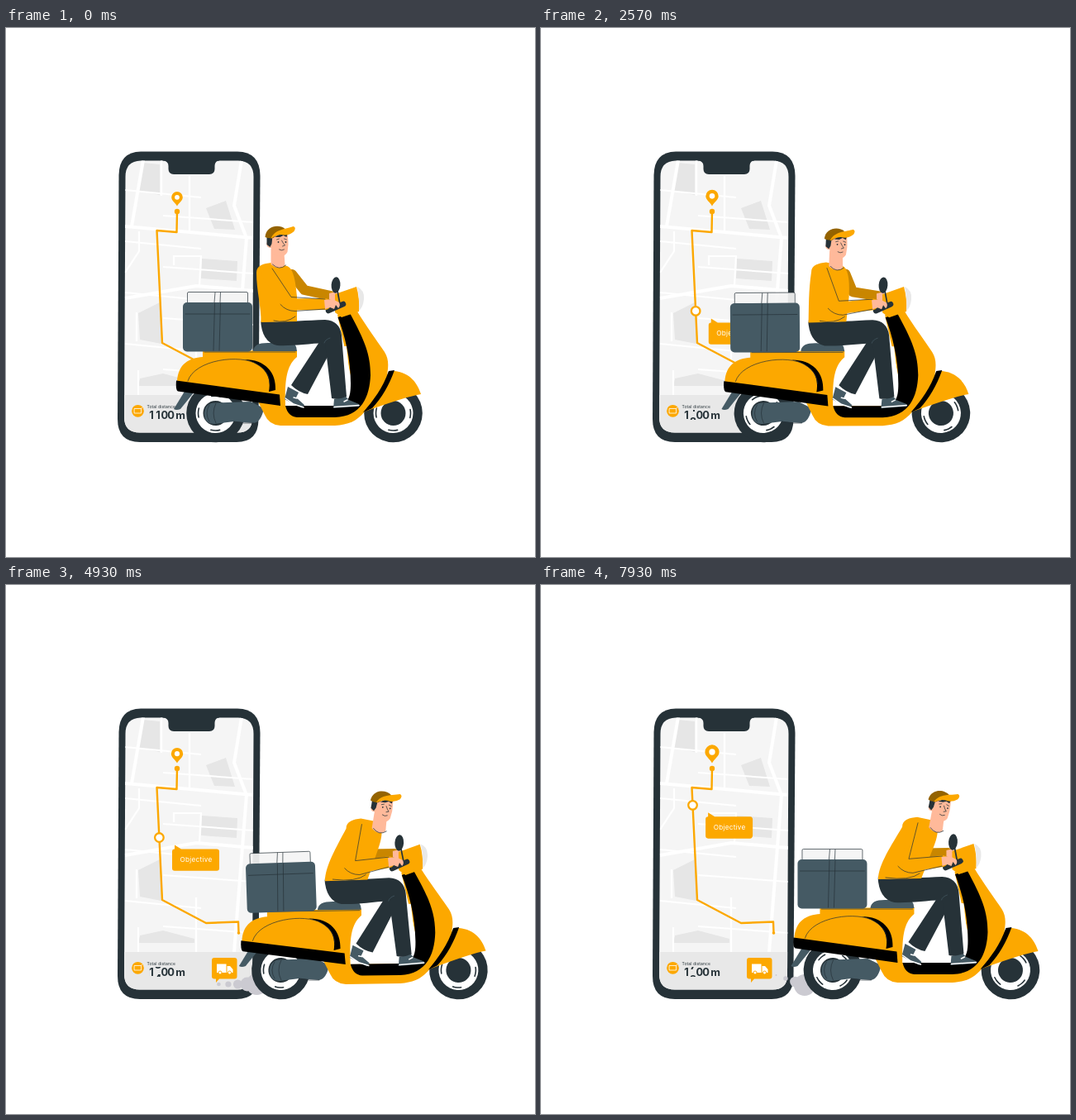
These frames come from a looping animation (640 by 640 pixels, 8 s). An HTML page:

```html
<!DOCTYPE html>
<html lang="en">
<head>
<meta charset="utf-8">
<title>Delivery scooter</title>
<style>
html, body { margin: 0; width: 100%; height: 100%; overflow: hidden; background: #fff; }
svg { display: block; width: 100vw; height: 100vh; }
.o { fill: #fca800; }
.d { fill: #263238; }
.g { fill: #455a64; }
.w { fill: #fff; }
.skin { fill: #ffb99a; }
.line { fill: none; stroke: #263238; stroke-width: .7; stroke-linecap: round; stroke-linejoin: round; }
.round { fill: none; stroke-linecap: round; stroke-linejoin: round; }
.road { fill: none; stroke: #fff; }
text { font-family: Inter, "Open Sans", sans-serif; }
.num { font-weight: 700; font-size: 12.8px; fill: #263238; text-anchor: middle; }
</style>
</head>
<body>
<svg viewBox="0 0 640 640" xmlns="http://www.w3.org/2000/svg">
  <defs>
    <clipPath id="screen"><path d="M163 160.500H281Q299.500 161 299.500 180L298 472Q298 489.500 280 489.500H162Q143 489.500 143 471L144.500 180Q144.500 161 163 160.500Z"/></clipPath>
    <clipPath id="slot"><rect x="179" y="462" width="9.500" height="12"/></clipPath>
    <g id="wheel">
      <circle class="d" r="35.300"/>
      <circle class="w" r="24"/>
      <circle class="d" r="15"/>
      <circle class="line" r="21" stroke-dasharray="11 21.990" stroke-dashoffset="5.500" style="stroke-width:1.600"/>
    </g>
  </defs>

  <path class="d" d="M163 149.500H280Q307.500 150 307.500 179L305.500 474Q305 501 279 501H162Q135 501 135 473L136.500 178Q137 150 163 149.500Z"/>
  <g clip-path="url(#screen)">
    <rect x="140" y="158" width="162" height="334" fill="#f5f5f5"/>
    <path fill="#e6e6e6" d="M166 163L186 165V202L160 197ZM242 218L266 209L277 244L252 243ZM237 279L280 282L279 306L236 303ZM160 345L188 331V382L162 377ZM162 424L190 418L228 428V433H160Z"/>
    <g class="road">
      <path stroke-width="4" d="M144 240L299 254M144 327L230 312L299 318M285 160L276 215L291 254L276 444M152 240L166 160"/>
      <path stroke-width="2.200" d="M188 160V203M222 178V248M161 246V270L144 296M203 287V276H236L234 312M158 344V379M230 378V444M160 414V444"/>
      <g id="lanes" stroke-width="2"></g>
    </g>
    <rect x="140" y="444" width="162" height="48" fill="#e8e8e8"/>
  </g>
  <path class="d" d="M190 158H258V160.500Q252.500 161 252.500 167V170.500Q252.500 177 246 177H203Q196.500 177 196.500 170.500V167Q196.500 161 190 160.500Z"/>

  <path class="round" stroke="#fca800" stroke-width="2.400" d="M207 222L206.500 247L182.500 245L189 381L242 409L281 407.500L281.500 421"/>
  <circle class="o" cx="207" cy="222" r="3.200"/>
  <circle class="o" cx="281.500" cy="421" r="1.800"/>
  <g id="pin">
    <path class="o" d="M0 0C-2-4-6.800-6.500-6.800-10.700A6.800 6.800 0 0 1 6.800-10.700C6.800-6.500 2-4 0 0Z"/>
    <circle class="w" cy="-10.700" r="2.900"/>
  </g>
  <circle id="ring" class="w" r="5.300" stroke="#fca800" stroke-width="2.300"/>
  <g id="callout">
    <path class="o" d="M19 9L27 14H70Q73 14 73 17V37Q73 40.300 70 40.300H19Q16 40.300 16 37V17Q16 14 19 14Z"/>
    <text x="45" y="29.800" font-size="8.200" text-anchor="middle" fill="#fff" letter-spacing=".25">Objective</text>
  </g>

  <circle class="o" cx="159.500" cy="463.300" r="7.400"/>
  <path class="round" stroke="#fff" stroke-width=".8" d="M155.500 460.500H163.500V466H155.500ZM163.500 460.500L165 459"/>
  <text x="170.500" y="460" font-size="5" letter-spacing=".1" class="d">Total distance</text>
  <g class="num">
    <text x="176" y="472.600">1</text>
    <g clip-path="url(#slot)"><text id="digit" x="184"></text><text id="next" x="184"></text></g>
    <text x="191.800" y="472.600">0</text>
    <text x="199.600" y="472.600">0</text>
    <text x="211" y="472.600">m</text>
  </g>
  <path class="o" d="M252 451H276.500Q279.500 451 279.500 454V473.500Q279.500 476.500 276.500 476.500H258L254 481V476.500H252Q249 476.500 249 473.500V454Q249 451 252 451Z"/>
  <path class="w" d="M255 458.500H266.500V469H255ZM267.500 461H271L274.500 465V469H267.500Z"/>
  <g class="w" stroke="#fca800" stroke-width=".9"><circle cx="259" cy="469" r="2"/><circle cx="270.500" cy="469" r="2"/></g>

  <path id="streak" stroke="#fca800" stroke-width="1" opacity=".8"/>

  <g id="ride">
    <g id="smoke" fill="#cbcad1"></g>
    <g transform="translate(253.500 466)"><use href="#wheel" class="spin"/></g>
    <g transform="translate(468.500 466)"><use href="#wheel" class="spin"/></g>
    <path class="g" d="M203 461L217 438L228 440L211 461Q206 463 203 461Z"/>
    <path class="g" d="M252 453.500L296 452L312 460Q309 476 300 478L276 476L252 479Q240 479 240 466Q241 454 252 453.500Z"/>
    <path class="line" d="M246 456Q240 466 246 476M254 454Q248 466 254 478M276 476Q288 479 300 478"/>

    <g id="body">
      <path id="armB" class="round" stroke="#c98600" stroke-width="12"/>
      <path class="skin" d="M391 321L399 319L404 326L398 331L391 328Z"/>
      <path class="o" d="M207 428C208 406 222 399 238 398V391L352 390V398C340 408 337 424 338 457H425L401 347L425 343C434 358 450 380 458 392C463 400 463 408 461 420L463 416L470 415C489 417 498 430 502 443Q484 446 434 464C424 476 414 480 398 481H332Q318 480 313 468L304 450Z"/>
      <path class="w" d="M352 400C342 408 338 426 338 457H395C412 456 417 452 417 432L412 385L400 385Z"/>
      <path d="M401.500 350L416 345C434 378 441 395 441 420C440 446 430 470 398 471H352Q341 470 338 457H396C414 456 417 448 417 430C417 400 410 372 401.500 350Z"/>
      <path d="M463 415L470 414C463 433 455 447 443 460L432 465C445 450 456 435 463 415Z"/>
      <path d="M206 426.500L331 443.500L332 457L208 439.500Q205 438 206 426.500Z"/>
      <path d="M288 401C314 401 327 417 326 438L318 440C322 420 311 406 288 401Z"/>
      <path class="line" d="M220 427C228 401 284 394 304 407C314 413 319 420 319 430M240 392H350"/>
      <path class="g" d="M299 391C300 383 306 380.500 320 381L349 382Q352 386 352 391Z"/>

      <g id="box">
        <rect x="219.500" y="319.500" width="73" height="14" rx="2" fill="#f5f5f5" fill-opacity=".92"/>
        <path class="line" d="M219.500 332V321Q219.500 319.500 221 319.500H291Q292.500 319.500 292.500 321V332M253 320L252 332M259.500 320L259 332"/>
        <rect class="g" x="214" y="332" width="84" height="59.500" rx="5"/>
        <path class="line" d="M217 346H295M252.500 333L251 390M259.500 333L258 390"/>
      </g>

      <path class="d" d="M379 380L345 432Q354 441 365 443L391 394L394 375Z"/>
      <path class="g" d="M341 434L354 441L351 447L361 456L358 460L337 449Z"/>
      <path class="round" stroke="#fff" stroke-width="1.500" d="M338 448L348 455L360 459M348 447L352 448"/>
      <path class="g" d="M397 449L411 446L415 450L427 455V458L396 460Z"/>
      <path class="round" stroke="#fff" stroke-width="1.500" d="M397 458.500L427 456.500M409 452L413 450"/>
      <path class="d" d="M308 355C330 356 360 354 386 353Q404 354 406 372L412 446Q402 450 394 448L386 381C365 382 345 385 328 384Q309 380 308 352Z"/>
      <path class="line" d="M385 381Q386 377 392 375" style="stroke:#455a64"/>

      <path id="torso" class="o"/>
      <g id="head">
        <path class="skin" d="M-8 7V26Q2 34 9 27L8 12Z"/>
        <path class="skin" d="M-10-9L12-12Q13-4 13 2L12 11Q9 17 2 16Q-6 15-8 6Q-14 6-13 0Z"/>
        <path class="d" d="M-13-8L-6-9L-7 1L-9 5L-13 2ZM-3-7Q4-13 12-11L11-7L7-9L3-7Z"/>
        <path d="M-15-7C-14-21 2-23 9-17L-5-6Q-11-5-15-7Z" fill="#946300"/>
        <path class="o" d="M-8-5C-4-17 12-17 19-20Q23-19 20-14Q13-8 5-10Q-2-10-8-5Z"/>
        <path class="line" d="M5-3Q7 1 9 3L6 4M2 8Q5 10 8 8M-1-4L2-5M8-5L11-4M-6 26Q2 34 10 27"/>
        <g class="d"><circle cx="1" cy="-1" r=".9"/><circle cx="10" cy="-1" r=".9"/></g>
      </g>

      <path class="o" d="M398 322L424 313Q428 327 427 343L406 350L398 344Z"/>
      <path d="M425 313Q434 317 433 328Q432 338 427 342Q428 327 425 313Z" fill="#e8e8e8"/>
      <path class="round" stroke="#263238" stroke-width="1.700" d="M401 318L404 334"/>
      <ellipse class="d" cx="399" cy="311" rx="5.400" ry="9.700" transform="rotate(4 399 311)"/>
      <path class="round" stroke="#263238" stroke-width="6.500" d="M390 342L408 334"/>
      <path id="armF" class="round" stroke="#fca800" stroke-width="14"/>
      <path id="folds" class="line"/>
      <path class="skin" d="M385 329L395 328L403 332Q405 336 402 339L399 335L397 340L392 338L386 340Z"/>
    </g>
  </g>
</svg>
<script>
const LOOP = 8000;
const SVG = "http://www.w3.org/2000/svg";
const $ = id => document.getElementById(id);
const set = (id, attrs) => { for (const a in attrs) $(id).setAttribute(a, attrs[a]); };
const clamp = v => Math.min(1, Math.max(0, v));
const lerp = (a, b, k) => a + (b - a) * k;
const ease = (t, from, to) => {
  const u = clamp((t - from) / (to - from));
  return u * u * (3 - 2 * u);
};
const add = (parent, tag) => $(parent).appendChild(document.createElementNS(SVG, tag));
const spins = document.querySelectorAll(".spin");

// Side streets, evenly spaced between the two main avenues
for (let i = 0; i < 8; i++) {
  const y = 196 + i * 31;
  add("lanes", "path").setAttribute("d", i % 2 ? `M190 ${y}L299 ${y + 8}` : `M144 ${y}L236 ${y + 9}`);
}
const puffs = Array.from({ length: 5 }, () => add("smoke", "circle"));

// Creep forward, dash ahead, then start to fall back
const drive = t => .006 * Math.min(t, 3400) + 92.6 * ease(t, 3400, 6000)
  - 13.5 * Math.max(0, (t - 6850) / 1080) ** 3;

// Elbow of a two-bone arm, bent downwards
function elbow([sx, sy], [hx, hy], upper, fore) {
  const dist = Math.hypot(hx - sx, hy - sy);
  const ux = (hx - sx) / dist, uy = (hy - sy) / dist;
  const along = (upper ** 2 - fore ** 2 + dist ** 2) / (2 * dist);
  const out = Math.sqrt(Math.max(0, upper ** 2 - along ** 2));
  return [sx + ux * along - uy * out, sy + uy * along + ux * out];
}

function drawRider(k) {
  const hand = [386, 334];
  const [sx, sy] = [lerp(316, 348, k), lerp(298, 295, k)];
  const [ex, ey] = elbow([sx, sy], hand, 46, 42);
  const waist = 352 + 8 * k;
  set("torso", { d: `M${sx - 13} ${sy - 2}C${sx - 13} ${sy - 11} ${sx - 4} ${sy - 13} ${sx + 5} ${sy - 14}
    L${sx + 24} ${sy - 10}C${sx + 30} ${sy - 8} ${sx + 34} ${sy + 2} ${sx + 36 - 12 * k} ${sy + 27}
    L${waist} 355L308.500 356C309 338 ${sx - 13 - 12 * k} ${sy + 20} ${sx - 13} ${sy - 2}Z` });
  set("armF", { d: `M${sx} ${sy}L${ex} ${ey}L${hand}` });
  set("armB", { d: `M${sx + 30 - 6 * k} ${sy}L${361 + 4 * k} ${317 + 7 * k}L393 324` });
  set("folds", { d: `M${sx + 6} ${sy - 7}L${ex + 1} ${ey - 9}L386 328
    M${ex - 12} ${ey}Q${ex - 5} ${ey + 8} ${ex + 6} ${ey + 8}L386 340
    M${324 - 6 * k} 354Q${waist - 14} 358 ${waist - 2} 349` });
  set("head", { transform: `translate(${328.5 + 50 * k} ${260 + 8.5 * k}) rotate(${10 * k})` });
}

function drawScooter(t) {
  const hold = ease(t, 2000, 4000) - ease(t, 6790, 7930);
  const kick = ease(t, 3400, 4000) - ease(t, 4000, 4700);
  const slide = ease(t, 4900, 6790);
  set("ride", { transform: `translate(${drive(t)} 0)` });
  set("body", { transform: `rotate(${-.8 * hold} 468 466)` });
  set("box", { transform: `translate(${-3 * slide} ${hold - 3 * kick}) rotate(${-1.2 * hold - 4.5 * kick} 256 391)` });
  spins.forEach(w => w.setAttribute("transform", `rotate(${t * .165})`));
  drawRider(ease(t, 1800, 4000) + .08 * ease(t, 6000, 7930));

  const grow = ease(t, 3300, 4800), rise = ease(t, 4930, 6790);
  puffs.forEach((p, i) => {
    p.setAttribute("cx", 224.5 - 11.5 * i - 5 * rise);
    p.setAttribute("cy", 483 + (1 - 4 * i) * rise);
    p.setAttribute("r", 13 * .65 ** i * grow * (1 - .25 * i * rise));
  });
}

function drawPhone(t) {
  const y = 355 - 91 * ease(t, 700, 8700), x = 182.5 + 6.5 * (y - 245) / 136;
  set("ring", { transform: `translate(${x} ${y})`, opacity: clamp((t - 700) / 1300) });
  set("callout", { transform: `translate(${x - .4} ${y})`, opacity: clamp((t - 600) / 550) });

  const pulse = .68 * Math.exp(-t / 2000) * Math.sin(Math.PI * t / 1950) ** 2;
  set("pin", { transform: `translate(207 215.500) scale(${1 + pulse + .28 * ease(t, 6900, 8100)})` });

  const count = 1 + .305 * Math.max(0, (t - 1210) / 1000) ** 1.6;
  const whole = Math.floor(count), y0 = 472.6 - 17 * (count - whole);
  $("digit").textContent = whole;
  $("next").textContent = whole + 1;
  set("digit", { y: y0 });
  set("next", { y: y0 + 17 });
}

// Speed lines cross from the right edge and vanish behind the scooter
function drawStreak(t) {
  const start = [722, 3590, 5500, 6763].findLast(s => t >= s) ?? LOOP;
  const left = 640 - (t - start) * 1.1, right = Math.min(640, left + 150);
  set("streak", { d: left < 640 && right > 430 ? `M${Math.max(430, left)} 358H${right}` : "" });
}

function frame() {
  const t = performance.now() % LOOP;
  drawPhone(t);
  drawStreak(t);
  drawScooter(t);
  requestAnimationFrame(frame);
}
frame();
</script>
</body>
</html>
```
